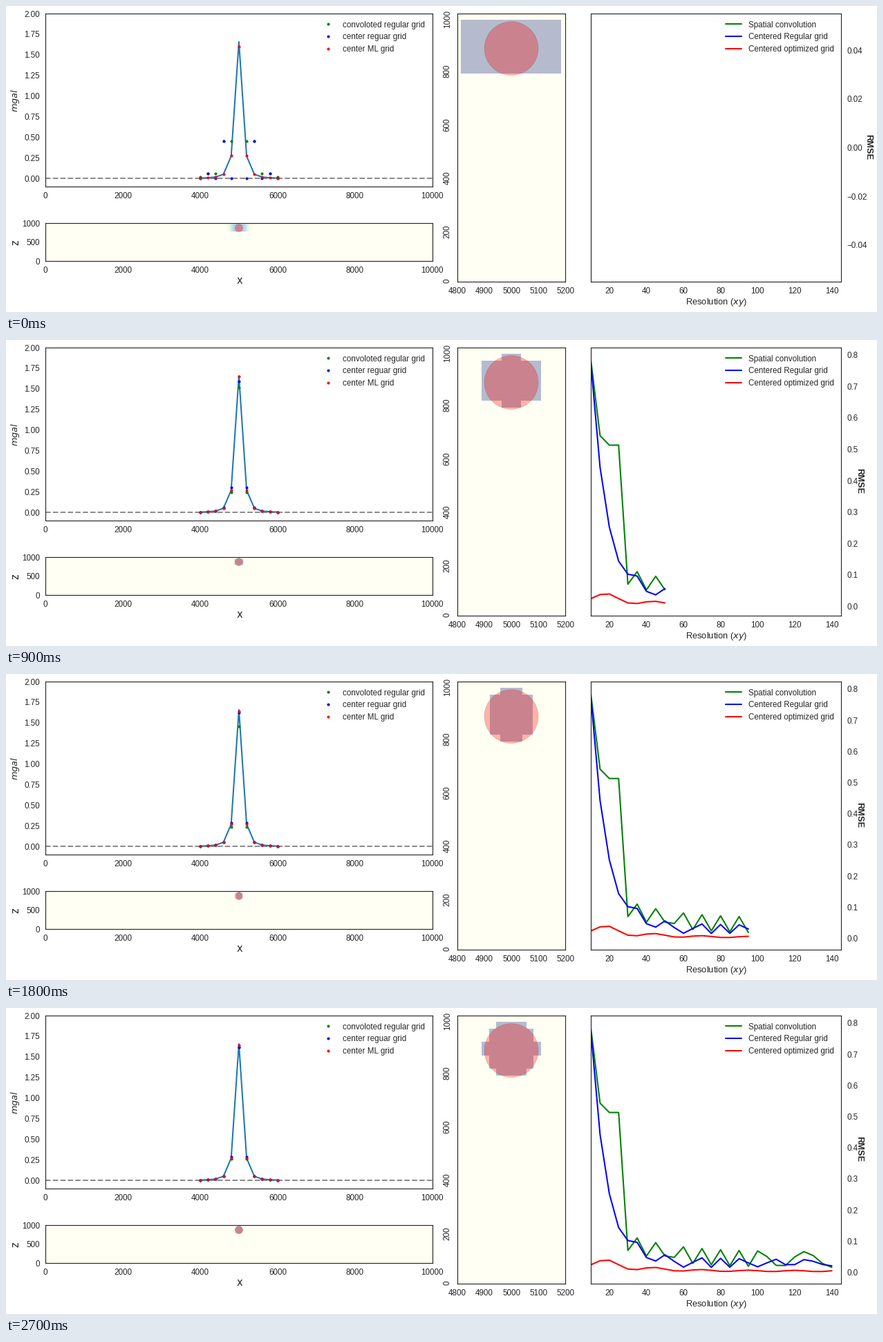
A matplotlib script for the animation above (2.8 s loop, 1260x444 px).

```python
import numpy as np
import matplotlib.pyplot as plt
from matplotlib.animation import FuncAnimation
from matplotlib.patches import Ellipse

W, H = 1260, 444
FRAMES = 28
PT = 0.84          # layout was designed at 84 dpi, the figure uses 100
INK = "0.15"
COLORS = ("green", "blue", "red")

plt.rcParams.update({
    "font.family": "Liberation Sans",
    "text.color": INK, "axes.labelcolor": INK, "axes.edgecolor": INK,
    "xtick.color": INK, "ytick.color": INK,
    "font.size": 10 * PT, "legend.fontsize": 10 * PT,
    "xtick.labelsize": 10 * PT, "ytick.labelsize": 10 * PT,
    "xtick.major.size": 0, "ytick.major.size": 0,
    "xtick.major.pad": 7 * PT, "ytick.major.pad": 7 * PT,
    "axes.linewidth": 1.0 * PT, "lines.linewidth": 1.75 * PT,
    "legend.frameon": False, "lines.solid_capstyle": "round",
})

res = 10 + 5 * np.arange(FRAMES)
coarse = res < 30


def wave(peaks, cycles):
    """Oscillation that reaches its crests at the given resolutions."""
    return np.cos(2 * np.pi * np.interp(res, peaks, cycles))


def decay(length, start=30):
    return np.exp(-(res - start) / length)


def rmse_curves():
    """Error of each method: steep start, then a fading ripple."""
    green = (.04 + .055 * decay(25)
             + .025 * wave([25, 35, 45, 60, 100, 125, 140],
                           [-1, 0, 1, 2, 6, 7, 7.5]))
    green[coarse] = [.785, .543, .513, .513]
    blue = .775 * .57 ** np.arange(FRAMES) + ~coarse * (
        .03 + .02 * decay(150) * wave([20, 35, 50, 70, 90, 110, 125, 140],
                                      [-1, 0, 1, 2, 4, 5, 6, 6.5]))
    red = (.004 + .036 * decay(20, 10)) * (
        1 + .5 * np.cos(2 * np.pi * (res - 20) / 25))
    return np.array([green, blue, red])


rmse = rmse_curves()

# Anomaly of a buried sphere, sampled from its centre outwards
truth = 1.657 / (1 + (200 * np.arange(6) / 130) ** 2) ** 1.5
# Response of a grid coarser than the sphere
blocky = np.array([4.2, .455, .455, .06, .06, .02])


def mirror(half):
    return np.concatenate([half[:0:-1], half])


def mask(i):
    """Cells of a regular grid whose centres lie inside the sphere."""
    n = max(27, int(2.5 * res[i]))
    cell = 10000 / n
    x = (np.arange(n) + .5) * cell - 5000
    z = (np.arange(40) + .5) * 25 - 875
    y = 0 if n % 2 else cell / 2
    return (x[None, :] ** 2 + y ** 2 + z[:, None] ** 2 <= 1e4).astype(float)


def fits(i):
    """Modelled anomaly of the three methods, off by their errors."""
    g, b, r = rmse[:, i]
    side = 3 if b > .12 else -2
    green = truth - g * np.array([2.9, .5, 0, 0, 0, 0])
    blue = truth + b * np.array([side, 1, .2, 0, 0, 0])
    red = truth + r * np.array([-2.5, .5, 0, 0, 0, 0])
    if res[i] < 20:
        green, blue = blocky, blocky * (np.arange(6) % 2 == 0)
    elif not mask(i).any():
        green = 0 * truth
    return [mirror(v) for v in (green, blue, red)]


fig = plt.figure(figsize=(W / 100, H / 100), dpi=100, facecolor="white")


def panel(x0, y0, x1, y1, xlim, ylim):
    ax = fig.add_axes([x0 / W, 1 - y1 / H, (x1 - x0) / W, (y1 - y0) / H])
    ax.set(xlim=xlim, ylim=ylim)
    return ax


def label(x, y, s, size=11, **kw):
    return fig.text(x / W, 1 - y / H, s, ha="center", va="center",
                    fontsize=size * PT, **kw)


def section(ax, interpolation):
    """Grid image with the sphere outline over it."""
    xlim, ylim = ax.get_xlim(), ax.get_ylim()
    im = ax.imshow(mask(0), extent=(0, 10000, 0, 1000), origin="lower",
                   aspect="auto", cmap="YlGnBu", vmin=0, vmax=1, alpha=.3,
                   interpolation=interpolation)
    ax.add_patch(Ellipse((5000, 870), 200, 200, facecolor="red",
                         edgecolor="black", linewidth=.3 * PT, alpha=.3))
    ax.set(xlim=xlim, ylim=ylim)
    return im


top = panel(57, 11, 616.8, 262, (0, 10000), (-.1, 2))
low = panel(57, 315, 616.8, 370, (0, 10000), (0, 1000))
mid = panel(653, 11, 809, 400, (4800, 5200), (0, 1000))
err = panel(846, 11, 1208, 400, (10, 145), (-.055, .055))

# Anomaly profile
xs = 4000 + 200 * np.arange(11)
top.axhline(0, color="grey", ls="--", alpha=.9)
top.plot(xs, mirror(truth), color="#1f77b4")
names = ("convoloted regular grid", "center reguar grid", "center ML grid")
dots = [top.plot([], [], ".", color=c, ms=7 * PT, mew=0, label=s)[0]
        for c, s in zip(COLORS, names)]
top.set_xticks(range(0, 10001, 2000))
top.set_yticks(np.arange(0, 2.1, .25))
top.yaxis.set_major_formatter("{x:.2f}")
top.legend(loc="upper right", numpoints=1)
label(14, 137, "$mgal$", rotation=90)

# Cross sections
low.set_xticks(range(0, 10001, 2000))
low.set_yticks([0, 500, 1000])
label(337.5, 398.5, "x", 12.5, family="DejaVu Sans")
label(13.5, 343, "z", 12.5, family="DejaVu Sans", rotation=90)
mid.set_xticks(range(4800, 5201, 100))
mid.set_yticks(range(0, 1001, 200))
mid.tick_params(axis="y", labelrotation=90)
images = [section(low, "hanning"), section(mid, "nearest")]

# Error curves
names = ("Spatial convolution", "Centered Regular grid",
         "Centered optimized grid")
curves = [err.plot([], [], color=c, label=s)[0]
          for c, s in zip(COLORS, names)]
err.set_xticks(range(20, 141, 20))
err.yaxis.tick_right()
err.legend(loc="upper right")
label(1027.5, 430, "Resolution ($xy$)")
rmse_label = label(1234, 204.5, "RMSE", rotation=270, weight="bold")


def draw(i):
    for dot, curve, values, errors in zip(dots, curves, fits(i), rmse):
        dot.set_data(xs, values)
        curve.set_data(res[:i], errors[:i])
    for im in images:
        im.set_data(mask(i))

    if i == 0:
        ticks, form, lo, hi = np.arange(-2, 3) * .02, "%.2f", -.05, .05
    else:
        ticks, form = np.arange(9) * .1, "%.1f"
        lo, hi = rmse[:, :i].min(), rmse[:, :i].max()
    pad = .05 * (hi - lo)
    err.set_ylim(lo - pad, hi + pad)
    err.set_yticks(ticks, [(form % t).replace("-", "\u2212") for t in ticks])
    rmse_label.set_x((1234 if i else 1247.5) / W)
    return []


anim = FuncAnimation(fig, draw, frames=FRAMES, interval=100, repeat=True,
                     repeat_delay=0, blit=False)
plt.show()
```
